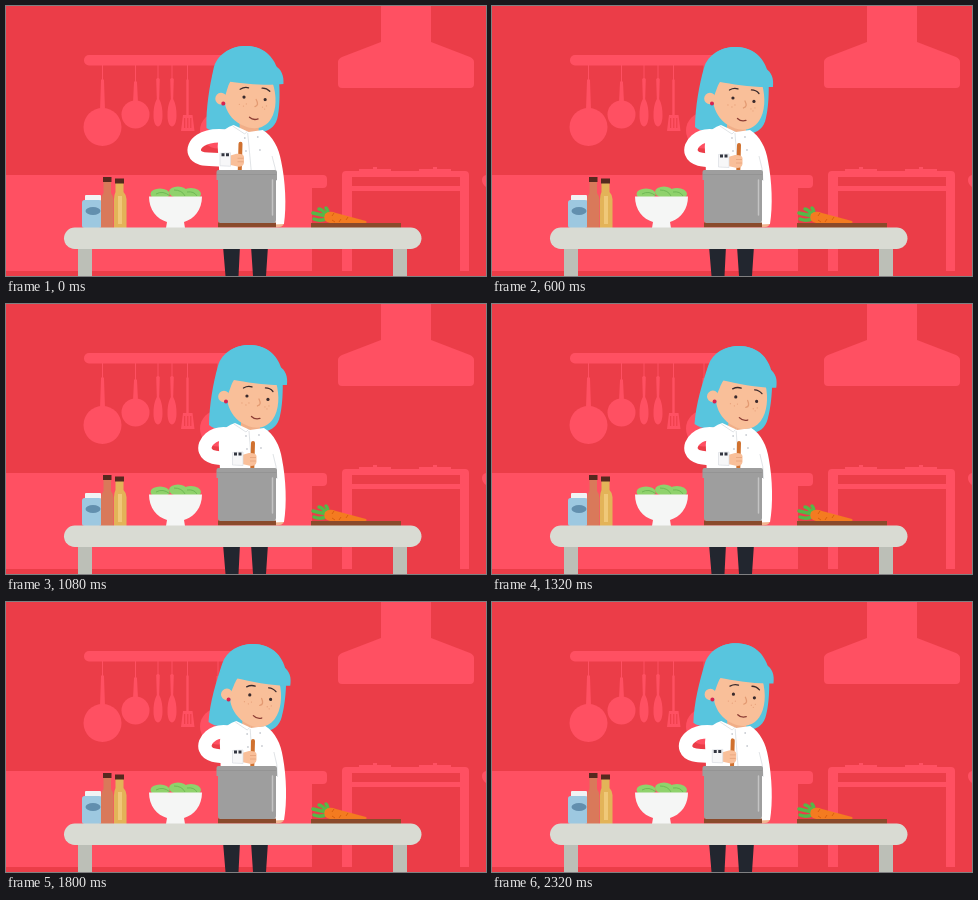
An HTML page for the animation above (2360 ms loop, 480 by 270 pixels).

```html
<!DOCTYPE html>
<html lang="en">
<head>
<meta charset="utf-8">
<title>Cooking</title>
<style>
  html, body { margin: 0; height: 100%; overflow: hidden; background: #eb3d48; }
  svg { display: block; width: 100vw; height: 100vh; }
</style>
</head>
<body>
<svg viewBox="0 0 480 270">
  <defs>
    <g id="spoon">
      <path d="M0 59V73" stroke="#ff5062"/>
      <path d="M-1.8 73Q0 71 1.8 73L1.2 93C4 98 4.6 104 4.5 110C4.4 117 2 120.500 0 120.500S-4.400 117-4.500 110C-4.600 104-4 98-1.200 93Z"/>
    </g>
  </defs>
  <rect width="480" height="270" fill="#eb3d48"/>

  <g id="kitchen" fill="#ff5062">
    <path d="M375 0H425V36L464 51Q468 53 468 56V78Q468 82 464 82H336Q332 82 332 78V56Q332 53 336 51L375 36Z"/>
    <path d="M0 169H317Q321 169 321 173V178Q321 182 317 182H306V265H0ZM480 169Q476 170 476 174T480 181Z"/>
    <path fill-rule="evenodd" d="M340 165H459Q463 165 463 169V265H336V169Q336 165 340 165ZM346 171V180H454V171ZM346 185V265H454V185Z"/>
    <path d="M353 163H385V165H353ZM413 163H445V165H413ZM367 161H371V165H367ZM427 161H431V165H427Z"/>
    <rect x="78" y="49" width="150" height="10.500" rx="5"/>
    <g stroke="#ff5062"><path d="M96.500 59V74M129.500 59V76M181.500 59V74M212 59V74"/></g>
    <path d="M95 74Q96.500 72 98 74L99 104H94ZM128 76Q129.500 74 131 76L132 97H127ZM180.300 74Q181.500 72 182.700 74V109H180.300ZM210.500 74H213.500L214.500 108H209.500Z"/>
    <circle cx="96.500" cy="121" r="19"/>
    <circle cx="129.500" cy="108.500" r="14"/>
    <circle cx="212" cy="124.500" r="18"/>
    <use href="#spoon" x="152"/>
    <use href="#spoon" x="166"/>
    <path d="M177 109H186.500L188.500 125H175Z"/>
    <path d="M178.700 112V122M181.800 112V122M184.800 112V122" stroke="#eb3d48"/>
  </g>

  <path fill="#22262f" d="M217 240H234L232.500 270H219.500ZM245 240H262L260 270H247Z"/>

  <g class="head"><path id="hair" fill="#58c5de"/></g>
  <g id="torso">
    <path fill="#f0ae88" d="M235 112H254V128H235Z"/>
    <path fill="#f2b48f" d="M269 215H277.500V219Q275 222 269 221Z"/>
    <path fill="#fff" d="M229 119L244 126L258 124C268 130 274 142 276 155C280 175 281 200 278 218L214 221C215 190 214 160 213 145C212 132 216 123 229 119Z"/>
    <path fill="none" stroke="#d9dce0" stroke-width=".8" d="M228 120L240 128L243 125M243 127L246 165M267 150Q271 162 271 175"/>
    <path fill="none" stroke="#c9ccd2" stroke-width="1.800" stroke-linecap="round" d="M240 132h0M253 131h0M241 145h0M255 144h0"/>
  </g>
  <g class="head">
    <path fill="#f9bf99" d="M222 74L270 78C274 92 273 106 267 115C261 124 250 126 240 121C230 117 224 108 222 100Z"/>
    <path fill="#58c5de" d="M210 74C213 50 228 41 243 41C258 41 270 49 273 62C280 66 282 73 281 81C262 82 240 78 228 76C225 80 224 87 221 92H209Z"/>
    <circle cx="218" cy="92.500" r="5.800" fill="#f9bf99"/>
    <circle cx="220" cy="97.500" r="2" fill="#d8234f"/>
    <g fill="#3a2a2c"><circle cx="241" cy="92" r="1.600"/><circle cx="262" cy="95.500" r="1.600"/></g>
    <g fill="none" stroke="#3a2a2c" stroke-width="1.300" stroke-linecap="round">
      <path d="M237.500 84Q242 81.500 246 83M259.500 84Q264 84 267 87.500"/>
      <path d="M245.500 112.500Q249 116 254 114.500" stroke="#8c3d34"/>
      <path d="M253 95Q256 101 251.500 102" stroke="#e39a72"/>
      <path d="M236 99h0M240 101h0M243 99h0M259 103h0M263 102h0M261 105h0" stroke="#e8a27c"/>
    </g>
  </g>
  <path id="arm" fill="none" stroke="#fff" stroke-width="13.500" stroke-linejoin="round"/>
  <g id="hand">
    <path d="M247 139L246 175" stroke="#d0712f" stroke-width="4" stroke-linecap="round"/>
    <path fill="#f9bf99" d="M236 151L243 149Q250 148.500 250.500 152V158Q250 162 245 162L236 160Z"/>
    <path fill="none" stroke="#e5a27c" stroke-width=".8" d="M244 153.500H250M244 157H250"/>
    <path fill="#f7f7f8" stroke="#dadde2" stroke-width=".7" d="M226.500 148.500L237 148V161.500L226.500 161Z"/>
    <path fill="#333640" d="M228 148.500H231V151.500H228ZM232.500 148.500H235.500V151.500H232.500Z"/>
  </g>

  <g id="counter">
    <rect x="212" y="216.500" width="58" height="5" fill="#8a4a2b"/>
    <path fill="#9e9e9e" d="M210.500 166Q210.500 164 212.500 164H269Q271 164 271 166V174H270V214Q270 217 267 217H215Q212 217 212 214V174H210.500Z"/>
    <path d="M211 168.500H270.500" stroke="#929292" stroke-width=".8"/>
    <path d="M266.500 174V209" stroke="#c4c4c4" stroke-width="1.500" stroke-linecap="round"/>

    <rect x="79" y="189" width="16" height="6" rx="1" fill="#f1f3f4"/>
    <rect x="76" y="194" width="19.500" height="28" rx="2.500" fill="#9dc8e0"/>
    <ellipse cx="87" cy="205" rx="7.500" ry="4" fill="#628fae"/>
    <path fill="#d9795a" d="M97.500 175H105V187Q107.500 190 107.500 194V222H95V194Q95 190 97.500 187Z"/>
    <path fill="#e3b358" d="M109.500 176H117.500V186Q120.500 189 120.500 193V222H108V193Q108 189 109.500 186Z"/>
    <path fill="#f0c878" d="M112 190H116V218H112Z"/>
    <path fill="#56291f" d="M97 171H105.500V176H97ZM109 172.500H118V177.500H109Z"/>

    <g fill="#8fd26c">
      <ellipse cx="154" cy="188" rx="9.500" ry="5.500"/><ellipse cx="185" cy="188" rx="10" ry="6"/><ellipse cx="172" cy="186" rx="9" ry="5.500"/>
    </g>
    <path d="M150 188Q157 184 164 190M168 184Q176 184 179 190M181 186Q188 185 191 190" fill="none" stroke="#70b956"/>
    <path fill="#f5f6f5" d="M143 190.500H196C196 204 188 213 178 216L179 222H160L161 216C151 213 143 204 143 190.500Z"/>

    <rect x="305" y="217" width="90" height="5" fill="#8a4a2b"/>
    <path fill="none" stroke="#55b848" stroke-width="3.500" stroke-linecap="round" d="M321 210Q315 209 307 207M321 210Q316 203 313 203M321 212Q315 216 308 213M322 209Q322 204 320 202"/>
    <path fill="#f47b20" d="M319 208Q323 204 330 207L360 215Q362 217 358 217H324Q316 215 319 208Z"/>
    <path d="M328 207L326 210M335 213L333 216M342 211L340 214M326 214L329 216" stroke="#d9600f"/>

    <path fill="#bcbfb7" d="M72 240H86V270H72ZM387 240H401V270H387Z"/>
    <rect x="58" y="221.500" width="357.500" height="21.500" rx="10.750" fill="#d9dbd3"/>
  </g>
</svg>
<script>
  const LOOP = 2360, STIR = 480, STEP = 40;
  const $ = id => document.getElementById(id);
  const heads = document.querySelectorAll('.head');
  const swing = t => (1 - Math.cos(2 * Math.PI * t / STIR)) / 2;

  function draw(now) {
    const t = Math.floor(now % LOOP / STEP) * STEP;
    const reach = swing(t) - 0.5;
    const sway = swing(t - 24) - 0.35;    // the head trails the hand
    const drag = Math.sin(2 * Math.PI * t / STIR);

    const tilt = `translate(${5 * sway} ${2.3 * sway}) rotate(${8.5 * sway} 236 120)`;
    heads.forEach(head => head.setAttribute('transform', tilt));
    $('hair').setAttribute('d', `M212 62C216 48 230 41 243 41C262 41 272 52 276 66
      C278 85 276 105 274 112C272 122 266 126 258 128L222 123
      C214 126 207 125 ${202 + drag} 121C${202.5 + drag} 100 207 80 212 62Z`);

    const lean = 4 * sway / 96;
    $('torso').setAttribute('transform', `matrix(1 0 ${-lean} 1 ${221 * lean} 0)`);

    const dx = 25 * reach, dy = 2.5 * reach, elbow = 199.5 + 21.5 * reach;
    $('arm').setAttribute('d', `M${224 + 3 * reach} 130.500
      C${elbow + 7} 127 ${elbow - 3} 139 ${elbow} 147
      C${elbow + 3} 155 ${elbow + 15} ${154 + dy} ${229 + dx} ${155 + dy}`);
    $('hand').setAttribute('transform', `translate(${dx} ${dy})`);
    requestAnimationFrame(() => draw(performance.now()));
  }
  draw(performance.now());
</script>
</body>
</html>
```
